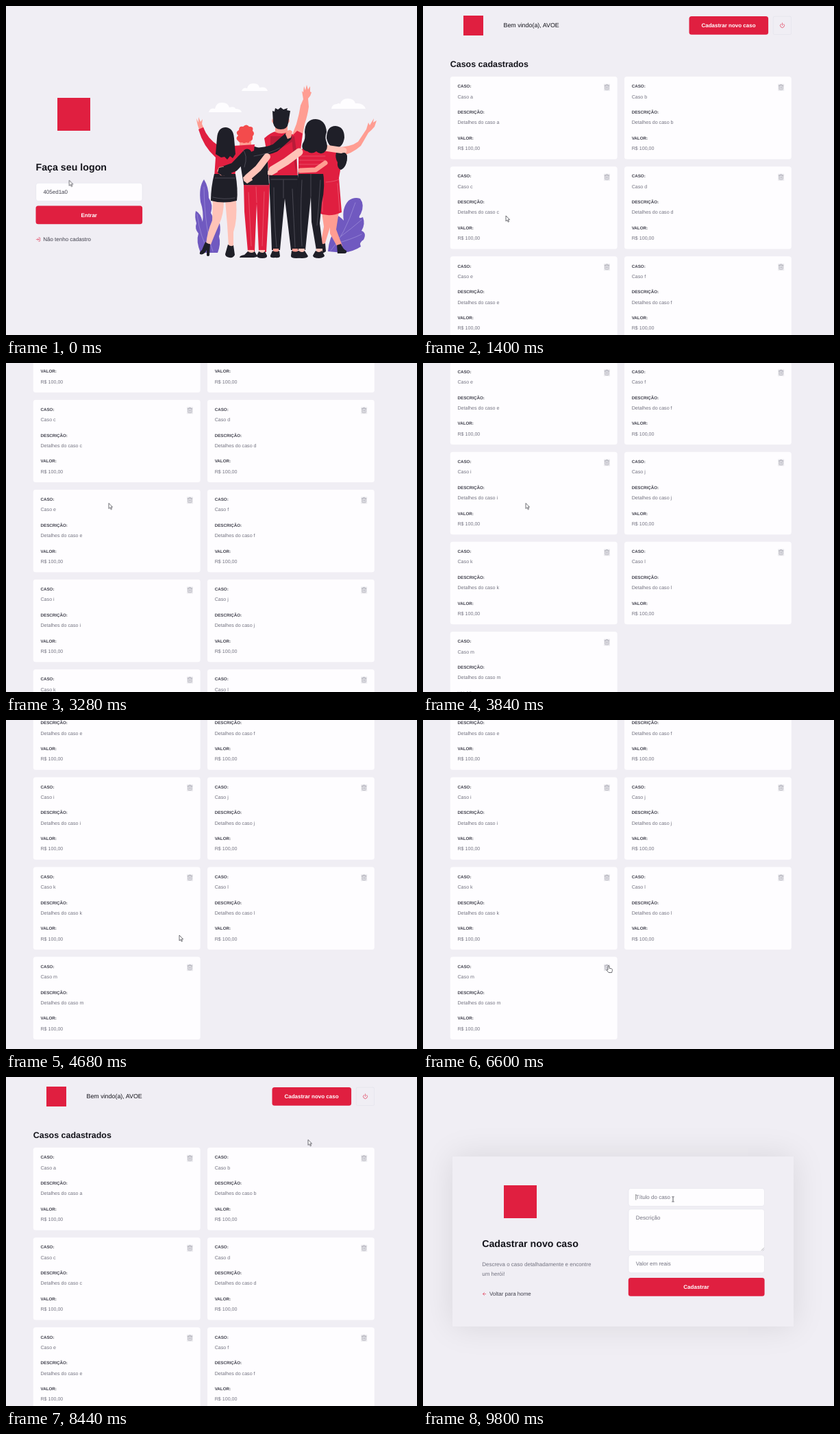
An HTML page for the animation above (10000 ms loop, 600 px wide and 480 px high).

```html
<!DOCTYPE html>
<html lang="pt-BR">
<head>
<meta charset="utf-8">
<title>Casos</title>
<style>
html, body { margin: 0; width: 100%; height: 100%; overflow: hidden; background: #f0eef4; }
svg { position: absolute; left: 0; top: 0; width: 600px; height: 480px; }
text { font: 8px "Liberation Sans", Arial, sans-serif; fill: #41414d; text-rendering: geometricPrecision; }
.h1 { font-size: 14.22px; font-weight: bold; fill: #13131a; }
.h2 { font-size: 12.45px; font-weight: bold; fill: #13131a; }
.hi { font-size: 8.89px; fill: #13131a; }
.btn { font-weight: bold; fill: #fff; text-anchor: middle; }
.label { font-size: 6.22px; font-weight: bold; }
.val { font-size: 7.11px; fill: #737380; }
.soft { fill: #737380; }
.red { fill: #e01f40; }
.dark { fill: #1f1f28; }
.skin { fill: #ff9d92; }
.pale { fill: #ffc3b8; }
.leaf { fill: #7059c0; }
.white { fill: #fefdff; }
.field { fill: #fefdff; stroke: #dcdce6; stroke-width: .5; }
.icon, .seam, .limb { fill: none; stroke-linecap: round; stroke-linejoin: round; }
.icon { stroke: #e01f40; stroke-width: 2; }
.trash { stroke: #a8a8b3; }
.seam { stroke: #74737f; stroke-width: .5; }
.limb { stroke: #1f1f28; stroke-width: 12; }
.modal { position: absolute; left: 43.3px; top: 115.7px; width: 497.8px; height: 248.6px; background: #f0eef4; box-shadow: 0 0 44.5px rgba(0,0,0,.1); }

.login, .home, .new, #list, #mouse, .arrow, .hand, .beam, .caret, .enter, .create { animation: 10s step-end infinite; }
.login { animation-name: login; }
.home { animation-name: home; }
.new { animation-name: new; }
.arrow { animation-name: arrow; }
.hand { animation-name: hand; }
.beam { animation-name: beam; }
.caret { animation-name: caret; }
.enter { animation-name: enter; }
.create { animation-name: create; }
#list { animation-name: scroll; animation-timing-function: linear; }
#mouse { animation-name: move; animation-timing-function: ease-in-out; }

@keyframes login { 0% { visibility: visible } 13%, 100% { visibility: hidden } }
@keyframes home { 0% { visibility: hidden } 13% { visibility: visible } 88.4%, 100% { visibility: hidden } }
@keyframes new { 0% { visibility: hidden } 88.4%, 100% { visibility: visible } }
@keyframes arrow {
  0%, 13%, 71.6%, 88.4% { visibility: visible }
  5.6%, 51.4%, 86.2%, 92.6%, 100% { visibility: hidden }
}
@keyframes hand {
  0%, 13%, 71.6%, 88.4%, 100% { visibility: hidden }
  5.6%, 51.4%, 86.2% { visibility: visible }
}
@keyframes beam { 0% { visibility: hidden } 92.6%, 100% { visibility: visible } }
@keyframes caret { 0% { visibility: hidden } 96.8%, 100% { visibility: visible } }
@keyframes enter { 0% { filter: none } 6%, 100% { filter: brightness(.92) } }
@keyframes create { 0% { filter: none } 86.6%, 100% { filter: brightness(.92) } }
@keyframes scroll {
  0%, 26% { transform: translateY(0) }
  26.8% { transform: translateY(-10.4px) }
  32.8% { transform: translateY(-180.2px) }
  37% { transform: translateY(-330px) }
  39.5% { transform: translateY(-395px) }
  41.5%, 72.4% { transform: translateY(-413px) }
  76% { transform: translateY(-115.4px) }
  77.4% { transform: translateY(-30px) }
  78.8%, 100% { transform: translateY(0) }
}
@keyframes move {
  0% { transform: translate(92.3px, 254.3px) }
  7% { transform: translate(117px, 302px) }
  11%, 14% { transform: translate(121px, 306px) }
  20%, 42% { transform: translate(150px, 204.5px) }
  46.4%, 47.4% { transform: translate(253px, 314px) }
  52% { transform: translate(269px, 357px) }
  54%, 70.8% { transform: translate(271px, 358px) }
  74%, 78.4% { transform: translate(333.5px, 306.5px) }
  84%, 84.8% { transform: translate(441px, 91.5px) }
  87%, 88.8% { transform: translate(441px, 30px) }
  91.6% { transform: translate(362px, 140px) }
  94.5% { transform: translate(345px, 178px) }
  97.6%, 100% { transform: translate(365px, 178.3px) }
}
</style>
</head>
<body>
<div class="modal new"></div>
<svg viewBox="0 0 600 480">
  <g class="login">
    <rect class="red" x="75" y="134" width="48" height="48"/>
    <text class="h1" x="43.5" y="239.9">Faça seu logon</text>
    <rect class="field" x="43.7" y="258.3" width="155.4" height="26.4" rx="3.5"/>
    <text x="54.4" y="273.6">405ed1a0</text>
    <rect class="red enter" x="43.5" y="291.6" width="155.6" height="26.7" rx="3.5"/>
    <text class="btn" x="121.2" y="307.6">Entrar</text>
    <path class="icon" transform="translate(43.4 337) scale(.296)" d="M15 3h4a2 2 0 0 1 2 2v14a2 2 0 0 1-2 2h-4M10 17l5-5-5-5M15 12H3"/>
    <text x="54.2" y="343.4">Não tenho cadastro</text>

    <g class="white">
      <path d="M296 155q2-7 9-5 2-10 11-9 8 0 10 7 8-2 9 2 8 0 9 5z"/>
      <path d="M344 124q2-6 8-4 2-8 10-7 7 0 8 6 10-2 12 5z"/>
      <path d="M475 150q1-7 8-7 3-2 5 0 2-8 11-8 9 0 11 7 12-1 15 8z"/>
    </g>

    <g class="leaf">
      <path d="M284 360Q277 343 281 332 275 325 278 317 275 307 277 299 284 302 287 315 289 300 284 286 281 264 289 253 296 264 296 280 303 290 299 302 305 311 303 326 305 319 312 317 314 328 311 336 314 347 309 360z"/>
      <path d="M470 358Q472 336 482 325 473 316 477 306 483 302 493 313 490 295 500 284 508 278 517 281 524 290 518 303 512 312 521 308 525 318 519 328 527 331 522 341 515 345 518 351 508 358 492 360 484 357z"/>
    </g>
    <path class="seam" style="stroke:#b5a8e4" d="M289 264Q290 325 302 358M279 304Q284 340 296 357M510 287Q494 335 474 357M519 312Q504 325 489 336M519 333Q503 341 483 346"/>

    <!-- tall man -->
    <path class="skin" d="M413 200L424 172Q428 158 430 145L434 136 432 124 434 126 435 117 437 123 439 115 441 122 444 117 444 125 446 126Q445 131 441 135L442 147Q440 161 436 172L431 200z"/>
    <path class="red" d="M377 193Q387 184 394 183H411Q416 185 419 188L425 182 433 186 430 211H424L426 253H384L381 215z"/>
    <path d="M386 190V216L418 198 417 188Q419 222 424 245V211L421 190z" fill="#b91b38"/>
    <path class="skin" d="M393 174H411V184Q402 188 393 184zM389 164q-3 5 3 8zM413 164q3 5-3 8z"/>
    <path class="dark" d="M390 171L389 153 392 154 393 149 397 151 401 148 405 151 411 149 410 152 415 153 412 171Q411 180 401 180 392 180 390 171z"/>
    <path class="dark" d="M384 247H426L427 300 427 356H416L407 281 400 356H388L386 300z"/>
    <path class="seam" d="M405 254V280M391 265Q391 310 395 352M418 267Q420 310 422 352"/>
    <path class="skin" d="M390 354h8v6h-8zM418 354h8v6h-8z"/>
    <path class="dark" d="M389 357q6 3 10 0l1 8q-1 3-7 2-8 1-7-3zM417 357q6 3 10 0l3 8q0 3-6 3-9 0-8-4z"/>

    <!-- red-haired man -->
    <path class="red" d="M347 259H385L383 305 380 359H369L366 288 363 358H353L348 300z"/>
    <path class="seam" style="stroke:#f18091" d="M365 264L366 287M354 272L358 350M377 271L374 350"/>
    <path class="pale" d="M353 356h9v5h-9zM369 356h9v5h-9z"/>
    <path class="dark" d="M353 358q6 4 10 0l4 7q-2 2-8 2h-18q0-3 7-4zM369 358q6 4 9 0l3 6q1 4-7 4-8 0-8-4z"/>
    <path class="dark" d="M341 210Q349 203 360 204L381 211 384 261H347L343 236z"/>
    <path class="limb" d="M361 213Q380 213 393 207L411 191"/>
    <path class="skin" d="M408 187q2-7 7-6l3 2-2 9-5 2zM341 192h17v13q-8 6-17 0z"/>
    <path d="M339 197q-5-4 0-8-5-5 1-8 0-6 6-5 5-5 9 0 7-1 5 6 4 4 0 8 1 7-4 7-1 4-5 2-4 2-6 0-4 1-6-2z" fill="#f34b4c"/>

    <!-- skirt woman -->
    <path class="pale" d="M302 284H318Q318 304 311 319 304 335 299 348L292 347Q294 329 301 313zM320 284H336Q338 312 332 330L332 351H325L323 319z"/>
    <path class="dark" d="M291 344q4 4 7 3l-1 17q-2 2-4 0l0-8q-4 8-10 6-1-3 3-6zM324 348q5 4 8 1l2 14q-2 5-8 4-6-1-6-5z"/>
    <path class="skin" d="M283 182Q279 174 278 164L281 170 281 162 284 169 287 165 286 172 289 179z"/>
    <path class="red" d="M281 180L288 177Q294 193 309 203L332 204 363 202 362 211 337 222 334 250H304L306 221Q288 205 281 180z"/>
    <path class="skin" d="M312 195h14v12q-7 5-14 0z"/>
    <path class="dark" d="M304 245H335Q339 268 337 284 318 289 299 284 299 265 304 245z"/>
    <path class="seam" d="M305 251H334M302 279Q318 283 334 280"/>
    <path class="limb" style="stroke-width:13" d="M352 215L333 235 316 241"/>
    <path class="seam" d="M345 209Q354 217 348 235M362 219Q386 215 400 207"/>
    <path class="skin" d="M318 234l-7 1-3 6 5 6 6 1z"/>
    <path class="dark" d="M308 193Q309 177 321 177 332 178 333 193L335 216 331 222 327 219 323 224 319 220 314 221 306 216z"/>
    <path class="dark" d="M311 236L326 233 330 247 316 248 309 243z"/>

    <!-- woman in the dress -->
    <path class="skin" d="M461 300H478L472 326 465 349H459L464 322zM472 300H486L482 326 491 350 484 352 473 332z"/>
    <path class="dark" d="M459 345q3 4 7 1l1 12q-5 4-14 3l6-8zM483 349l6-2q3 8 8 10 1 4-3 4h-10z"/>
    <path class="skin" d="M482 206Q503 206 514 198L526 180 529 170 531 174 537 164 536 170 541 167 538 176Q533 182 529 185L518 204Q505 216 487 219z"/>
    <path class="red" d="M458 213Q471 204 486 208L491 222 486 251 490 301Q472 309 456 302L460 250z"/>
    <path class="seam" style="stroke:#f18091" d="M467 257Q481 256 486 253M462 263V300M484 259L487 299"/>
    <path class="skin" d="M474 198h12v12h-12z"/>
    <path class="dark" d="M468 193Q468 175 481 175 494 176 494 192 492 206 482 207 471 207 468 193zM482 214q12-5 16 5 0 16-9 20-6-2-5-11-4-7-2-14z"/>

    <!-- woman with long hair -->
    <path class="dark" d="M427 238H462Q467 262 461 287L458 317 463 356H453L446 315 445 278 437 356H426L424 278z"/>
    <path class="seam" d="M445 245V278M432 254Q429 310 432 350M459 254Q456 300 454 320"/>
    <path class="pale" d="M427 354h9v6h-9zM453 354h9v6h-9z"/>
    <path class="dark" d="M427 357q6 4 9 0l5 8q-1 3-9 3-10 0-9-4zM452 357q5 4 9 0l4 7q0 3-8 4-9 0-9-4z"/>
    <path class="red" d="M427 211Q443 202 466 207L467 229 463 245H427z"/>
    <path class="seam" style="stroke:#f0798a" d="M428 219H466M428 225H466M428 231H465"/>
    <path class="limb" style="stroke:#ffc3b8;stroke-width:11" d="M428 213L409 227 389 239"/>
    <path class="limb" style="stroke:#ffc3b8;stroke-width:9" d="M466 207L493 211"/>
    <path class="limb" style="stroke:#ff9d92;stroke-width:7" d="M466 229L452 239 430 240"/>
    <path class="dark" d="M436 184Q437 165 452 165 467 166 468 184 465 192 468 199 471 209 464 214 458 217 453 212 446 217 440 212 430 210 433 201 438 193 436 184z"/>
    <path class="dark" d="M488 216q8-5 10 3 0 15-9 19-5-2-4-10 3-4 3-12z"/>

    <path class="limb" style="stroke:#ffc3b8;stroke-width:10" d="M381 220L368 237 353 250"/>
    <path class="pale" d="M355 243l-9 7 1 5 5 4 8-5zM390 234l-8 7 0 5 6 1 9-5z"/>
    <path class="seam" d="M350 262H383M387 253H425"/>
  </g>

  <g class="home">
    <g id="list">
      <rect class="red" x="59" y="14" width="29" height="29"/>
      <text class="hi" x="117.5" y="31.3">Bem vindo(a), AVOE</text>
      <rect class="red create" x="388.5" y="15" width="115.6" height="26.7" rx="3.5"/>
      <text class="btn" x="446" y="31">Cadastrar novo caso</text>
      <rect class="field" style="fill:none" x="511.3" y="15.2" width="26.4" height="26.4" rx="2"/>
      <path class="icon" transform="translate(520.5 24.2) scale(.333)" d="M18.36 6.64a9 9 0 1 1-12.73 0M12 2v10"/>
      <text class="h2" x="39.8" y="89.3">Casos cadastrados</text>
      <g id="cards"></g>
    </g>
  </g>

  <g class="new">
    <rect class="red" x="118" y="158" width="48" height="48"/>
    <text class="h1" x="86.2" y="247.8">Cadastrar novo caso</text>
    <text class="soft" x="86.2" y="275.6">Descreva o caso detalhadamente e encontre</text>
    <text class="soft" x="86.2" y="289.8">um herói!</text>
    <path class="icon" transform="translate(86 313) scale(.296)" d="M19 12H5M12 19l-7-7 7-7"/>
    <text x="96.9" y="319.3">Voltar para home</text>
    <g class="field">
      <rect x="300" y="162.5" width="198.4" height="26" rx="3.5"/>
      <rect x="300" y="192.8" width="198.4" height="61.4" rx="3.5"/>
      <rect x="300" y="259.8" width="198.4" height="26" rx="3.5"/>
    </g>
    <path class="seam" d="M494 253l3.5-3.5M496 253.2l1.5-1.5"/>
    <text class="soft" x="310.8" y="177.6">Título do caso</text>
    <text class="soft" x="310.8" y="207.7">Descrição</text>
    <text class="soft" x="310.8" y="275">Valor em reais</text>
    <rect class="red" x="299.8" y="293" width="198.8" height="26.7" rx="3.5"/>
    <text class="btn" x="399" y="309.2">Cadastrar</text>
    <path class="caret" d="M310.8 171v8.5" stroke="#333" stroke-width=".6"/>
  </g>

  <g id="mouse">
    <path class="arrow" d="M0 0V8L1.9 6.3 3.2 9.2 4.5 8.6 3.2 5.8H5.6z" fill="#fff" stroke="#33333b" stroke-width=".7"/>
    <path class="hand" d="M-1 1Q0-.5 1 1V4.2L4.5 5Q5.6 5.4 5.5 6.8L4.6 10.5H0L-3 6.8Q-3 5.5-1 6.4z" fill="#fff" stroke="#33333b" stroke-width=".7"/>
    <path class="beam" d="M-1.7-3.6H-.5L0-3.2.5-3.6H1.7M0-3.2V3.2M-1.7 3.6H-.5L0 3.2.5 3.6H1.7" fill="none" stroke="#33333b" stroke-width=".8"/>
  </g>
</svg>
<script>
const bin = "M3 6h18M19 6v14a2 2 0 0 1-2 2H7a2 2 0 0 1-2-2V6m3 0V4a2 2 0 0 1 2-2h4a2 2 0 0 1 2 2v2M10 11v6M14 11v6";

const entry = (label, value, y) =>
  `<text class="label" x="10.7" y="${y}">${label}:</text>
   <text class="val" x="10.7" y="${y + 15.3}">${value}</text>`;

const card = (id, i) => `
  <g transform="translate(${39.8 + i % 2 * 254.2} ${103.1 + (i >> 1) * 131.1})">
    <rect class="white" width="243.8" height="120.4" rx="3.5"/>
    ${entry("CASO", "Caso " + id, 16.3)}
    ${entry("DESCRIÇÃO", "Detalhes do caso " + id, 54)}
    ${entry("VALOR", "R$ 100,00", 91.8)}
    <rect x="224.2" y="10.6" width="9" height="10" fill="#ecebef"/>
    <path class="icon trash" transform="translate(224.2 10.8) scale(.37)" d="${bin}"/>
  </g>`;

document.getElementById("cards").innerHTML = [..."abcdefijklm"].map(card).join("");
</script>
</body>
</html>
```
